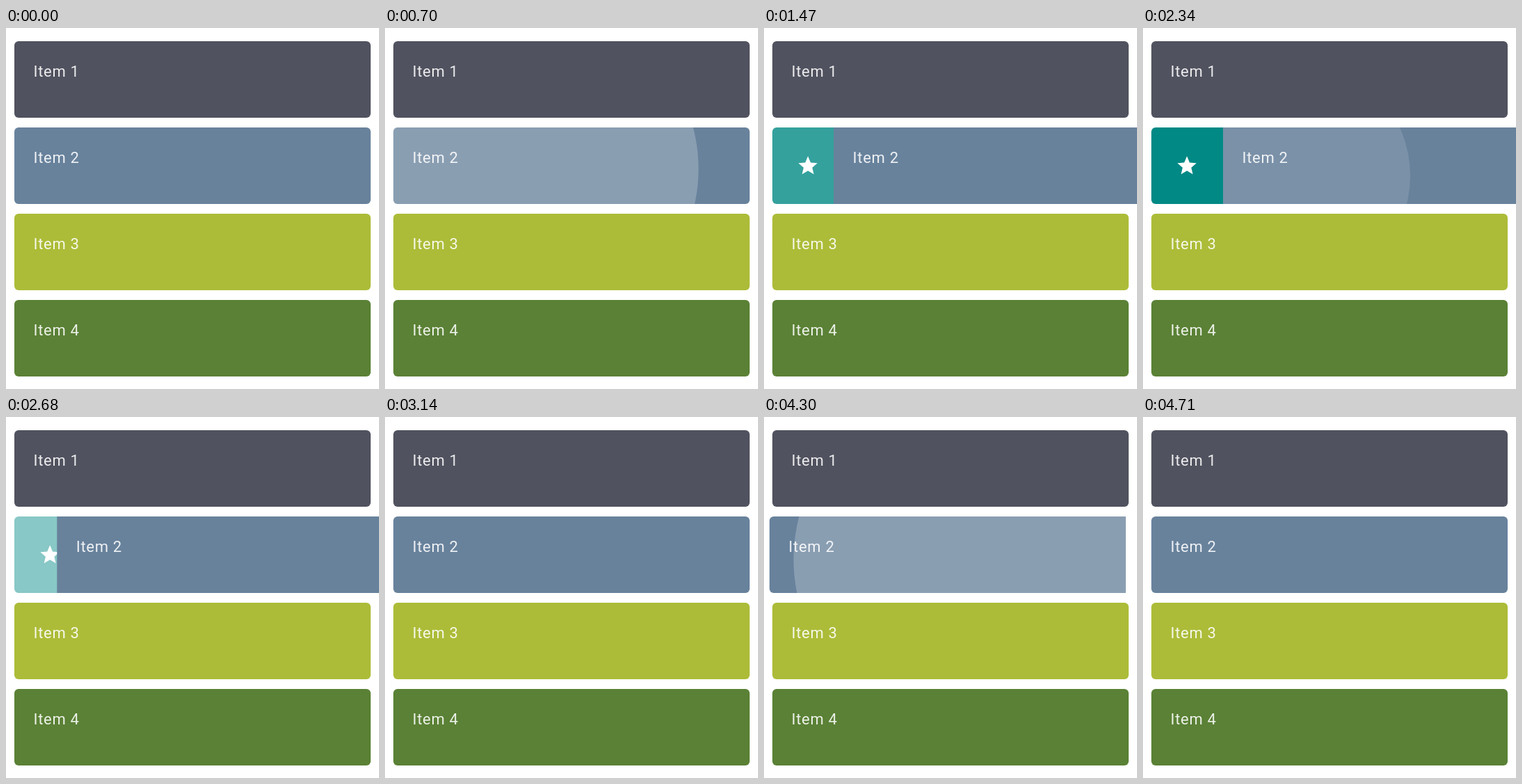
Recreate the animation shown at these times as an HTML page. Size 536x519 px, loop 5400 ms.

```html
<!DOCTYPE html>
<html lang="en">
<head>
<meta charset="utf-8">
<title>Swipe list</title>
<style>
  html, body { margin: 0; width: 100%; height: 100%; overflow: hidden; background: #fff; }
  svg { display: block; }
  text { font: 22px Roboto, sans-serif; letter-spacing: .69px; fill: #fff; fill-opacity: .89; }
</style>
</head>
<body>
<svg width="536" height="519" viewBox="0 0 536 519">
  <defs><clipPath id="clip"><path id="clipShape"/></clipPath></defs>
  <g transform="translate(12 19)"><rect width="512" height="110" rx="6" fill="#50525f"/><text x="27.5" y="51">Item 1</text></g>
  <g transform="translate(12 267)"><rect width="512" height="110" rx="6" fill="#acbc38"/><text x="27.5" y="51">Item 3</text></g>
  <g transform="translate(12 391)"><rect width="512" height="110" rx="6" fill="#5a8135"/><text x="27.5" y="51">Item 4</text></g>
  <g id="action">
    <rect id="back" x="12" y="143" width="512" height="110" rx="6" fill="#008985"/>
    <path transform="translate(46.7 181.6) scale(1.37)" fill="#fff"
      d="M12 17.27L18.18 21l-1.64-7.03L22 9.24l-7.19-.61L12 2 9.19 8.63 2 9.24l5.46 4.73L5.82 21z"/>
  </g>
  <g id="card">
    <path id="face" fill="#68829c"/>
    <g clip-path="url(#clip)"><circle id="ripple" fill="#fff"/></g>
    <text x="27.5" y="51">Item 2</text>
  </g>
</svg>
<script>
const LOOP = 5400, WIDTH = 512, HEIGHT = 110, CORNER = 6, REVEAL = 103;
const $ = id => document.getElementById(id);
const clamp = v => Math.max(0, Math.min(1, v));

const linear = p => p;
const easeIn = p => p * p;
const easeOut = p => 1 - (1 - p) ** 2;
const smooth = p => p * p * (3 - 2 * p);

// Cubic Bezier (0.4, 0, 0.2, 1)
function standard(p) {
  let lo = 0, hi = 1;
  for (let i = 0; i < 20; i++) {
    const s = (lo + hi) / 2, q = 1 - s;
    if (1.2 * s * q * q + .6 * s * s * q + s ** 3 < p) lo = s; else hi = s;
  }
  return lo * lo * (3 - 2 * lo);
}

// [time, card offset, easing towards it]
const keys = [
  [0, 0], [890, 0, linear], [1090, 20, easeIn], [1180, 36, linear], [1200, 36, linear],
  [1590, REVEAL, smooth], [2440, REVEAL, linear], [2880, 30, smooth], [2910, 30, linear],
  [3140, 0, easeOut], [3490, 0, linear], [3670, -11, easeOut], [3770, -14, easeOut],
  [3930, -14, linear], [4090, 0, smooth], [4240, 0, linear], [4300, -4, linear],
  [4450, -14, easeOut], [4490, -14, linear], [4710, 0, smooth], [LOOP, 0, linear]
];

// [press time, first visible, x, y] within the card
const presses = [[600, 640, 85, 70], [2300, 2340, 85, 71], [3430, 3490, 354, 80], [4187, 4250, 354, 86]];

function offsetAt(t) {
  const i = keys.findIndex(k => k[0] > t);
  const [t0, a] = keys[i - 1], [t1, b, ease] = keys[i];
  return a + (b - a) * ease((t - t0) / (t1 - t0));
}

// Corners on the side that uncovers the background turn square.
function cardPath(offset) {
  const open = Math.max(0, CORNER - Math.abs(offset) * 1.3);
  const l = offset > 0 ? open : CORNER, r = offset < 0 ? open : CORNER;
  return `M${l} 0H${WIDTH - r}a${r} ${r} 0 0 1 ${r} ${r}V${HEIGHT - r}a${r} ${r} 0 0 1 ${-r} ${r}` +
    `H${l}a${l} ${l} 0 0 1 ${-l} ${-l}V${l}a${l} ${l} 0 0 1 ${l} ${-l}z`;
}

function set(id, attrs) {
  for (const name in attrs) $(id).setAttribute(name, attrs[name]);
}

function drawRipple(t) {
  const press = presses.find(([start, shown]) => t >= shown && t < start + 340);
  if (!press) return set('ripple', { opacity: 0 });
  const [start, , x, y] = press, age = t - start, e = standard(clamp(age / 225));
  set('ripple', {
    cx: x + (WIDTH / 2 - x) * e,
    cy: y + (HEIGHT / 2 - y) * e,
    r: 154 + 113 * e,
    opacity: .225 * clamp(age / 75) * clamp((340 - age) / 150)
  });
}

function draw(t) {
  const offset = offsetAt(t), d = cardPath(offset);
  set('action', { visibility: offset > 0 ? 'visible' : 'hidden' });
  set('back', { opacity: clamp(offset / REVEAL) ** 1.47 });
  set('card', { transform: `translate(${12 + offset} 143)` });
  set('face', { d });
  set('clipShape', { d });
  drawRipple(t);
}

const begin = performance.now();
function tick() {
  draw((performance.now() - begin) % LOOP);
  requestAnimationFrame(tick);
}
tick();
</script>
</body>
</html>
```
